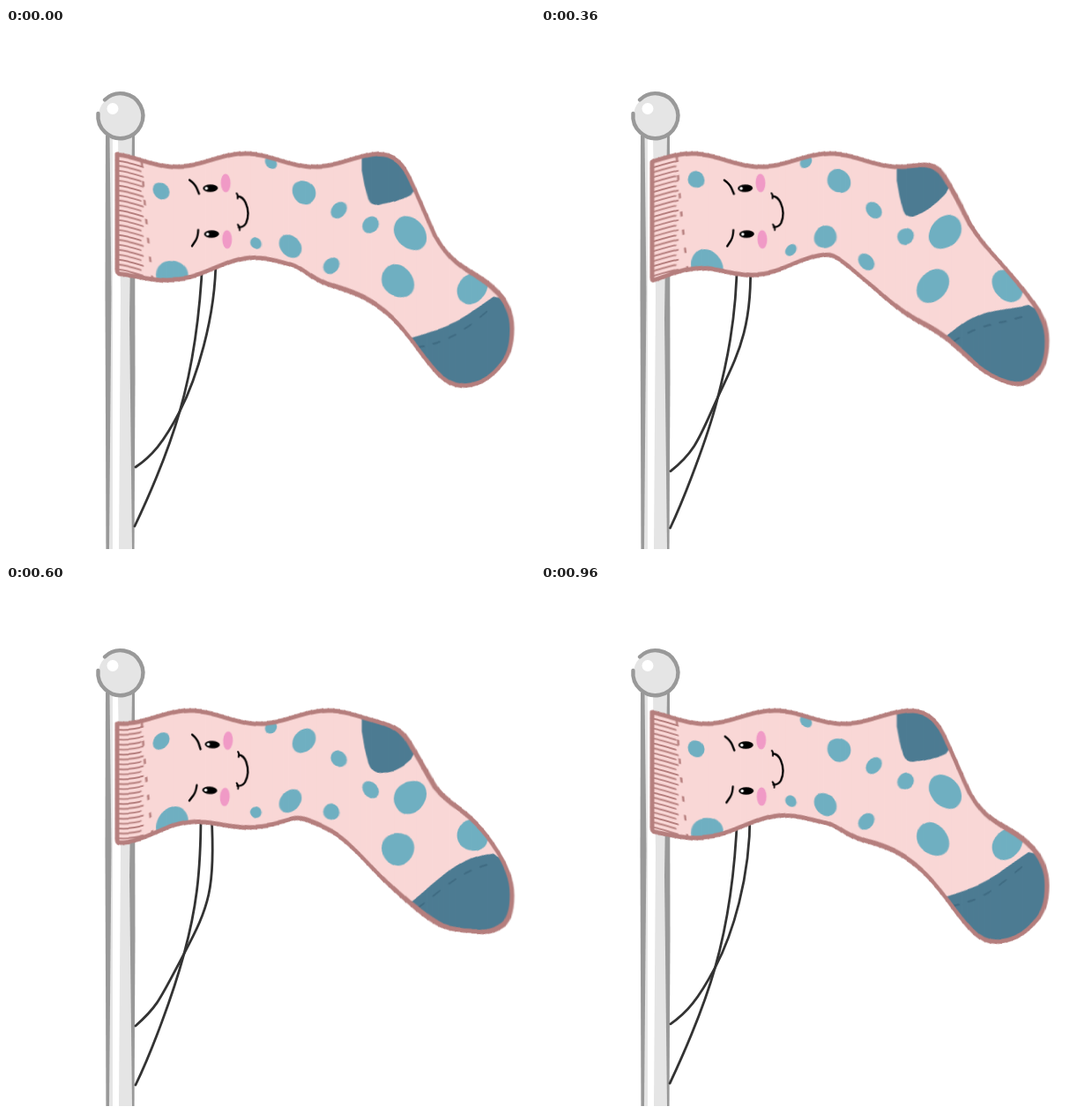
Recreate the animation shown at these times as an HTML page without scripts. Size 600 by 600 pixels, loop 1 s.

```html
<!DOCTYPE html>
<html lang="en">
<head>
<meta charset="utf-8">
<title>Sock flag</title>
<style>
html, body { margin: 0; width: 100%; height: 100%; overflow: hidden; background: #fff; }
svg { display: block; width: 100%; height: 100%; }

/* The sock is cut into narrow upright strips; each one bobs and shears
   40 ms after its left neighbour, which makes a travelling wave. */
.s {
  --x: calc(114px + var(--i) * 6.27px);
  translate: var(--x) 0;
  clip-path: url(#strip);
  animation: wave 1s steps(2) infinite;
  animation-delay: calc(var(--i) * .04s - 4.001s);
}
.s use { translate: calc(-1 * var(--x)) 0; }
@keyframes wave {
  0%   { transform: translateY(-7.5px) skewY(0deg); }
  8%   { transform: translateY(-6.57px) skewY(-8.3deg); }
  16%  { transform: translateY(-4.02px) skewY(-14.4deg); }
  24%  { transform: translateY(-.47px) skewY(-16.9deg); }
  32%  { transform: translateY(3.2px) skewY(-15.4deg); }
  40%  { transform: translateY(6.07px) skewY(-10.1deg); }
  48%  { transform: translateY(7.44px) skewY(-2.2deg); }
  56%  { transform: translateY(6.97px) skewY(6.4deg); }
  64%  { transform: translateY(4.78px) skewY(13.2deg); }
  72%  { transform: translateY(1.4px) skewY(16.6deg); }
  80%  { transform: translateY(-2.32px) skewY(16.1deg); }
  88%  { transform: translateY(-5.47px) skewY(11.8deg); }
  96%  { transform: translateY(-7.27px) skewY(4.3deg); animation-timing-function: steps(1); }
  100% { transform: translateY(-7.5px) skewY(0deg); }
}
.face {
  transform-origin: 242px 208px;
  animation: sway .5s cubic-bezier(.37, 0, .63, 1) -.81s infinite alternate;
}
@keyframes sway {
  from { transform: rotate(-3.8deg); }
  to   { transform: rotate(3.8deg); }
}
.line { fill: none; stroke-linecap: round; stroke-linejoin: round; }
.dots { fill: #6fafc1; }
.navy { fill: #4c7b92; }
</style>
</head>
<body>
<svg viewBox="0 0 600 600">
<defs>
  <path id="shape" d="M126 150H415C436 150 447 155 456 170C468 191 477 212 487 231C497 247 508 256 520 266C532 276 543 285 553 298C567 314 574 330 574 348C574 366 570 380 560 388C552 396 542 400 530 400C515 400 505 397 495 390C484 382 473 370 461 357C452 348 442 338 430 329C420 321 410 313 400 306C390 299 380 292 370 287C360 282 354 278 345 273C336 267 329 264 322 264.5C305 265 288 266 270 269C250 272 220 276 190 278C170 281 150 284 129 285Q126 285 126 281Z"/>
  <clipPath id="inside"><use href="#shape"/></clipPath>
  <clipPath id="strip"><rect y="-50" width="7.6" height="700"/></clipPath>
  <g id="sock">
    <use href="#shape" fill="#f9d7d6"/>
    <g clip-path="url(#inside)">
      <g class="dots">
        <circle cx="176" cy="179" r="9.5"/>
        <circle cx="300.5" cy="155.5" r="6.8"/>
        <circle cx="338" cy="180" r="13.3"/>
        <circle cx="377.5" cy="203.5" r="9.2"/>
        <circle cx="413.5" cy="229.5" r="9.4"/>
        <circle cx="458.5" cy="235" r="18.6"/>
        <circle cx="444.5" cy="292.5" r="18.5"/>
        <circle cx="529" cy="291" r="17.5"/>
        <circle cx="322.5" cy="244" r="12.8"/>
        <circle cx="369" cy="264.5" r="9.3"/>
        <circle cx="283.5" cy="250.5" r="6.5"/>
        <circle cx="188.5" cy="275" r="18.3"/>
      </g>
      <g class="navy">
        <path d="M403.5 140V166Q406 184 411 200Q414 208 422 208Q442 206 459 192L490 140Z"/>
        <path d="M459 354Q505 325 553 307L600 330V420H480Z"/>
      </g>
      <path class="line" d="M467 362Q508 342 552 318" stroke="#3f6b82" stroke-width="2" stroke-dasharray="8 12"/>
    </g>
    <g class="line" stroke="#b57e7d">
      <g style="stroke-linecap:butt">
        <path d="M140 156V282" stroke-width="32" stroke-dasharray="1.9 9.3"/>
        <path d="M140 161.6V282" stroke-width="27" stroke-dasharray="1.9 9.3"/>
        <path d="M154 152Q158 215 166 280" stroke-width="2.5" stroke-dasharray="6 15"/>
      </g>
      <use href="#shape" stroke-width="5"/>
    </g>
  </g>
</defs>

<g class="pole">
  <path d="M113.5 120H145.5V591H113.5Z" fill="#e5e5e5"/>
  <path d="M121 125H127L130 300L128 591H121Z" fill="#fff"/>
  <path d="M113 122H117.5L119.5 300L117 591H113.5L112.5 300Z" fill="#999"/>
  <path d="M143 122H146L146.5 400L145.5 591H143L140 330Z" fill="#999"/>
  <circle cx="129.8" cy="100.5" r="25" fill="#e5e5e5"/>
  <path class="line" d="M112 81.5A25.5 25.5 0 1 1 104.5 97" stroke="#999" stroke-width="4.4"/>
  <circle cx="121" cy="91.5" r="6.5" fill="#fff"/>
</g>

<g class="line" stroke="#333" stroke-width="2.8">
  <path d="M223 260C220 330 210 390 197 435S165 525 146 565">
    <animate attributeName="d" dur="1s" repeatCount="indefinite" keyTimes="0;.24;.44;.6;.76;1" values="
      M223 260C220 330 210 390 197 435S165 525 146 565;
      M223 260C222 330 208 390 195 443S165 527 146 567;
      M222 260C222 330 211 380 202 412S162 535 147 567;
      M221 260C221 330 215 370 202 418S165 530 147 567;
      M221 260C220 330 211 385 200 428S165 525 147 566;
      M223 260C220 330 210 390 197 435S165 525 146 565"/>
  </path>
  <path d="M238 260C238 330 215 400 197 435S165 486 147 498">
    <animate attributeName="d" dur="1s" repeatCount="indefinite" keyTimes="0;.24;.44;.6;.76;1" values="
      M238 260C238 330 215 400 197 435S165 486 147 498;
      M239 260C241 340 214 390 198 430S176 482 147 502;
      M236 260C241 345 225 365 202 412S176 478 147 503;
      M233 260C238 345 230 365 202 418S172 478 147 500;
      M232 260C234 345 226 385 200 428S168 480 147 497;
      M238 260C238 330 215 400 197 435S165 486 147 498"/>
  </path>
</g>

<g class="flag">
<g class="s" style="--i:1"><use href="#sock"/></g><g class="s" style="--i:2"><use href="#sock"/></g>
<g class="s" style="--i:3"><use href="#sock"/></g><g class="s" style="--i:4"><use href="#sock"/></g>
<g class="s" style="--i:5"><use href="#sock"/></g><g class="s" style="--i:6"><use href="#sock"/></g>
<g class="s" style="--i:7"><use href="#sock"/></g><g class="s" style="--i:8"><use href="#sock"/></g>
<g class="s" style="--i:9"><use href="#sock"/></g><g class="s" style="--i:10"><use href="#sock"/></g>
<g class="s" style="--i:11"><use href="#sock"/></g><g class="s" style="--i:12"><use href="#sock"/></g>
<g class="s" style="--i:13"><use href="#sock"/></g><g class="s" style="--i:14"><use href="#sock"/></g>
<g class="s" style="--i:15"><use href="#sock"/></g><g class="s" style="--i:16"><use href="#sock"/></g>
<g class="s" style="--i:17"><use href="#sock"/></g><g class="s" style="--i:18"><use href="#sock"/></g>
<g class="s" style="--i:19"><use href="#sock"/></g><g class="s" style="--i:20"><use href="#sock"/></g>
<g class="s" style="--i:21"><use href="#sock"/></g><g class="s" style="--i:22"><use href="#sock"/></g>
<g class="s" style="--i:23"><use href="#sock"/></g><g class="s" style="--i:24"><use href="#sock"/></g>
<g class="s" style="--i:25"><use href="#sock"/></g><g class="s" style="--i:26"><use href="#sock"/></g>
<g class="s" style="--i:27"><use href="#sock"/></g><g class="s" style="--i:28"><use href="#sock"/></g>
<g class="s" style="--i:29"><use href="#sock"/></g><g class="s" style="--i:30"><use href="#sock"/></g>
<g class="s" style="--i:31"><use href="#sock"/></g><g class="s" style="--i:32"><use href="#sock"/></g>
<g class="s" style="--i:33"><use href="#sock"/></g><g class="s" style="--i:34"><use href="#sock"/></g>
<g class="s" style="--i:35"><use href="#sock"/></g><g class="s" style="--i:36"><use href="#sock"/></g>
<g class="s" style="--i:37"><use href="#sock"/></g><g class="s" style="--i:38"><use href="#sock"/></g>
<g class="s" style="--i:39"><use href="#sock"/></g><g class="s" style="--i:40"><use href="#sock"/></g>
<g class="s" style="--i:41"><use href="#sock"/></g><g class="s" style="--i:42"><use href="#sock"/></g>
<g class="s" style="--i:43"><use href="#sock"/></g><g class="s" style="--i:44"><use href="#sock"/></g>
<g class="s" style="--i:45"><use href="#sock"/></g><g class="s" style="--i:46"><use href="#sock"/></g>
<g class="s" style="--i:47"><use href="#sock"/></g><g class="s" style="--i:48"><use href="#sock"/></g>
<g class="s" style="--i:49"><use href="#sock"/></g><g class="s" style="--i:50"><use href="#sock"/></g>
<g class="s" style="--i:51"><use href="#sock"/></g><g class="s" style="--i:52"><use href="#sock"/></g>
<g class="s" style="--i:53"><use href="#sock"/></g><g class="s" style="--i:54"><use href="#sock"/></g>
<g class="s" style="--i:55"><use href="#sock"/></g><g class="s" style="--i:56"><use href="#sock"/></g>
<g class="s" style="--i:57"><use href="#sock"/></g><g class="s" style="--i:58"><use href="#sock"/></g>
<g class="s" style="--i:59"><use href="#sock"/></g><g class="s" style="--i:60"><use href="#sock"/></g>
<g class="s" style="--i:61"><use href="#sock"/></g><g class="s" style="--i:62"><use href="#sock"/></g>
<g class="s" style="--i:63"><use href="#sock"/></g><g class="s" style="--i:64"><use href="#sock"/></g>
<g class="s" style="--i:65"><use href="#sock"/></g><g class="s" style="--i:66"><use href="#sock"/></g>
<g class="s" style="--i:67"><use href="#sock"/></g><g class="s" style="--i:68"><use href="#sock"/></g>
<g class="s" style="--i:69"><use href="#sock"/></g><g class="s" style="--i:70"><use href="#sock"/></g>
<g class="s" style="--i:71"><use href="#sock"/></g><g class="s" style="--i:72"><use href="#sock"/></g>
<g class="s" style="--i:73"><use href="#sock"/></g>
</g>

<g class="face">
  <g fill="#f09ac6">
    <ellipse cx="250" cy="176" rx="5.5" ry="10.5"/>
    <ellipse cx="250" cy="240" rx="5.5" ry="10.5"/>
  </g>
  <ellipse cx="232.5" cy="181.5" rx="8.5" ry="4.2"/>
  <ellipse cx="232.5" cy="233.5" rx="8.5" ry="4.2"/>
  <circle cx="228" cy="181.5" r="1.7" fill="#fff"/>
  <circle cx="228" cy="233.5" r="1.7" fill="#fff"/>
  <g class="line" stroke="#000" stroke-width="2.3">
    <path d="M209 171.500Q215 176 217 181L219.500 187.500"/>
    <path d="M217.500 228.500Q217 236 214.500 240L210 246.500"/>
    <path d="M263.500 191.500Q269 192 272 199Q277 211 272 222Q269 227 263.500 226.500"/>
    <path d="M262 188Q264 190 263 194M262.500 223.500Q265 226 264.500 230" stroke-width="1.800"/>
  </g>
</g>
</svg>
</body>
</html>
```
